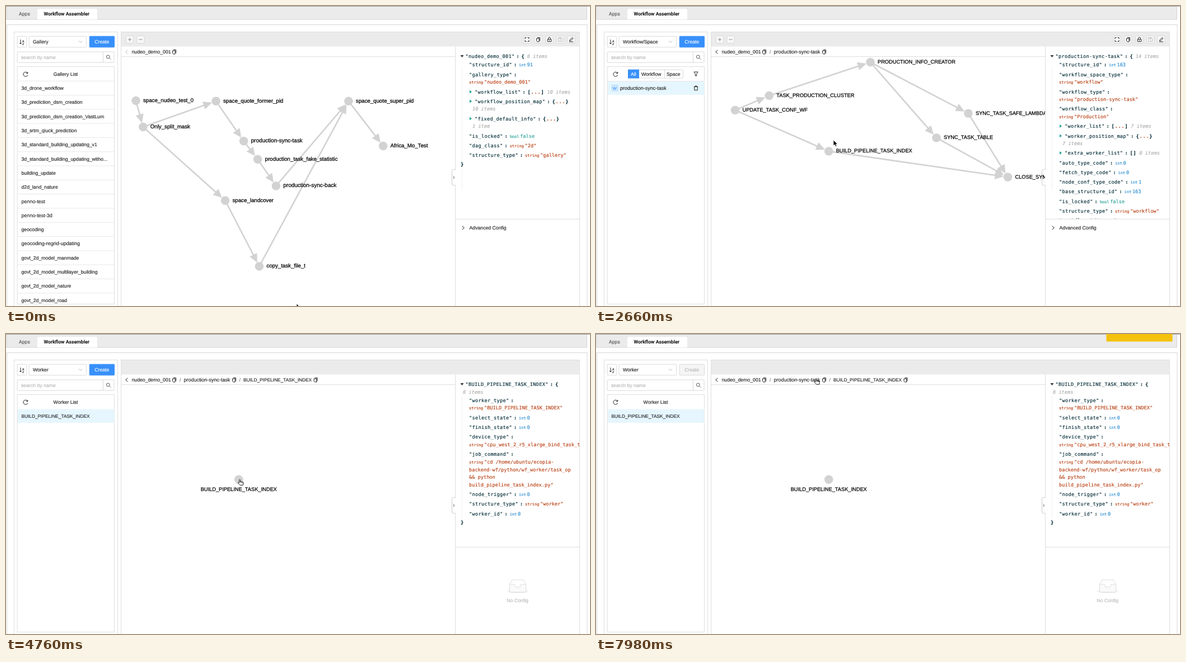
Recreate the animation shown at these times as an HTML page. Size 1043 by 537 pixels, loop 8 s.

```html
<!DOCTYPE html>
<html lang="en">
<head>
<meta charset="utf-8">
<title>Workflow Assembler</title>
<style>
html, body { margin: 0; width: 100%; height: 100%; overflow: hidden; background: #fff; }
svg { display: block; font: 8.7px "Liberation Sans", Arial, sans-serif; color: #222; }
text, tspan { fill: currentColor; stroke: currentColor; stroke-width: .15px; text-rendering: geometricPrecision; }
.label { color: #000; stroke-width: .25px; }
.mono { font: 8.65px "DejaVu Sans Mono", monospace; color: #002b36; }
.key { letter-spacing: .3px; }
.b { font-weight: bold; }
.fold { font-weight: bold; letter-spacing: .75px; }
.note { color: #aaa; font-style: italic; }
.type { font-size: 7px; }
.int { color: #268bd2; }
.bool { color: #2aa198; }
.string { color: #b83f12; }
</style>
</head>
<body>
<svg id="stage" width="1043" height="537" viewBox="0 0 1043 537"></svg>
<script>
const GREY = '#d2d2d2', BLUE = '#90caf9', PRIMARY = '#3890fa';
const stage = document.getElementById('stage');
const esc = s => s.replace(/&/g, '&amp;').replace(/</g, '&lt;');

// Hyphenated names run a little wide, capitals a little narrow.
const fit = s => /^[A-Z_]+$/.test(s) ? .955 : /-/.test(s) ? 1.03 : 1;
const text = (x, y, s, attrs = '', size = 8.7) =>
  `<text x="${x}" y="${y + 3.1}" font-size="${size * fit(s)}" ${attrs}>${esc(s)}</text>`;
const rect = (x, y, w, h, fill = '#fff', stroke = 'none', r = 0) =>
  `<rect x="${x}" y="${y}" width="${w}" height="${h}" rx="${r}" fill="${fill}" stroke="${stroke}"/>`;
const line = (d, color = '#222', width = 1) =>
  `<path d="${d}" fill="none" stroke="${color}" stroke-width="${width}"/>`;
const icon = (x, y, d, color) => `<g transform="translate(${x} ${y})">${line(d, color)}</g>`;
const copyIcon = (x, y) => icon(x, y, 'M-1.5-3.5h4.5v6M-3-2h4.5v6h-3l-1.5-1.5z');
const chevronRight = 'M-1.8-3.2L1.8 0-1.8 3.2';
const chevronDown = 'M-3-1.6L0 1.6 3-1.6';

function frame() {
  return rect(1, 0, 1036.5, 24, '#ebebeb', '#d4d4d4') +
    line('M0 .3H1043', '#8c8c8c') +
    '<path d="M56 24V8q0-3 3-3h101q3 0 3 3v16z" fill="#fff"/>' +
    text(23, 14, 'Apps', 'font-family="Roboto, sans-serif" color="#555"', 8.74) +
    text(67.5, 14, 'Workflow Assembler', 'font-family="Roboto, sans-serif" font-weight="700"', 8.74) +
    rect(1.5, 33.5, 1036.5, 520, 'none', '#d6d6d6') +
    rect(14.5, 46.5, 185, 520, 'none', '#dedede') +
    rect(205.5, 46.5, 819, 520, '#fff', '#dedede') +
    rect(206, 47, 818.5, 25.5, '#ebebeb') +
    line('M206 90.5H802M802.5 72V537M802.5 381.5H1024', '#dedede') +
    rect(20.2, 54.2, 16.6, 19.6, '#fff', '#d9d9d9', 1) +
    icon(26, 64, 'M0-4V4M-1.8 2L0 4 1.8 2') +
    text(29, 61.5, 'A', '', 5.5) + text(29, 67, 'Z', '', 5.5) +
    rect(41, 54.2, 102.6, 19.6, '#fff', '#d9d9d9', 1) + icon(133, 64, chevronDown, '#bbb') +
    rect(20.2, 82, 172.8, 19.2, '#fff', '#d9d9d9', 1) + line('M173.5 82V101', '#d9d9d9') +
    text(27, 91.5, 'search by name', 'color="#b5b5b5"') +
    icon(183, 91.5, 'M1.8 1.8L4 4M2.2-.6a2.9 2.9 0 1 1-5.8 0a2.9 2.9 0 1 1 5.8 0', '#555') +
    rect(20.2, 108.5, 173.2, 425, '#fff', '#dedede') +
    icon(35, 122, 'M3.3-2A4 4 0 1 0 3.8 1.3M3.8-4V-1.5H1.2');
}

function sidebar(mode, title, items) {
  let out = text(48, 64.2, mode);
  if (title) out += text(106.5, 122, title, 'text-anchor="middle"');
  else out += rect(57.5, 114.2, 98, 14.8, '#fff', '#d9d9d9', 1) + rect(57, 113.7, 20, 15.8, PRIMARY) +
    line('M122.5 114V129', '#d9d9d9') + text(62, 122, 'All', 'color="#fff"') +
    text(81, 122, 'Workflow') + text(126, 122, 'Space') +
    icon(178.5, 121.5, 'M-3.5-3.5H3.5L1.2 0V3.5H-1.2V0z');
  const single = items.length === 1;
  out += '<g clip-path="url(#listClip)">';
  if (single) out += rect(21, 134.5, 172.5, 24.5, '#e6f6fe');
  else out += line(items.map((_, i) => `M21 ${134.3 + i * 25.3}H193`).join(''), '#e8e8e8');
  items.forEach((name, i) => out += text(title ? 27.5 : 43, 147 + i * 25.3, name));
  if (!title) out += line('M21 134.5H193', '#e8e8e8') + rect(28.5, 141.5, 10.5, 10.5, '#d6ecfd', '#a9d4f7', 1) +
    text(29.8, 147, 'W', `color="${PRIMARY}"`, 8) +
    icon(178.5, 147, 'M-3.7-2.5H3.7M-1.4-2.5V-4H1.4V-2.5M-2.7-2.5V3.7H2.7V-2.5');
  return out + '</g>';
}

function crumbs(names, xs) {
  return icon(215.5, 82, 'M1.8-3.2L-1.8 0 1.8 3.2', names.length > 1 ? '#222' : '#bbb') +
    names.map((n, i) => text(xs[i], 82, n) + copyIcon([300.5, 407.5, 553][i], 82) +
      (i ? text(xs[i] - 7.5, 82, '/', 'color="#777"') : '')).join('');
}

function toolbar() {
  const box = x => rect(x - 6.5, 53.5, 13, 13, '#f8f8f8', '#d9d9d9', 1);
  const shapes = {
    221: 'M-3 0H3M0-3V3',
    240.5: 'M-3 0H3',
    930.5: 'M-3.5-1V-3.5H-1M1-3.5H3.5V-1M3.5 1V3.5H1M-1 3.5H-3.5V1',
    950.5: 'M-1.5-3.5H3v6M-3-2H1.5v6h-3L-3 2.5z',
    970.5: 'M-3.3-.3H3.3V3.7H-3.3zM-2-.3V-2a2 2 0 0 1 4 0V-.3M0 1v1.5',
    990: 'M-3.5-3.5H2L3.5-2V3.5H-3.5zM-1.5-3.5V-1.5H1.5V-3.5M-1 1H1',
    1009.5: 'M-3 2.5L-2.5.5 2-3.7 3.5-2.2-1 2zM-3.7 4H3.7'
  };
  return Object.entries(shapes).map(([x, d]) =>
    box(+x) + icon(x, 60, d, x < 300 ? '#888' : x === '990' ? '#bbb' : '#222')).join('');
}

const span = (s, cls, dx = 0) => `<tspan class="${cls}" dx="${dx}">${esc(s)}</tspan>`;
const keySpan = key => span(`"${key}"`, 'key') + span(':', 'b', 3);

// Each row reads: y, key (or -), kind, value.
function json(title, count, rows) {
  const monoText = (x, y, body) => `<text class="mono" x="${x}" y="${y + 3.1}">${body}</text>`;
  let out = '<g clip-path="url(#jsonClip)"><path d="M811.5 88h6l-3 4z" fill="#333"/>' +
    line('M814.5 111V330', '#f0f0f0') +
    monoText(820.5, 89.5, keySpan(title) + span('{', 'b', 4) + span(count, 'note', 5));
  for (const row of rows.trim().split('\n')) {
    const [ys, key, kind = '', ...rest] = row.trim().split(' ');
    const y = +ys, value = rest.join(' '), isFold = /^[[{]/.test(kind);
    let body = key === '-' ? '' : keySpan(key);
    const gap = body ? 4 : 0;
    if (isFold) {
      out += `<path d="M828 ${y - 3}l4 3-4 3z" fill="#2aa198"/>`;
      body += span(kind[0], 'fold', gap) + span(kind.slice(1, -1), 'fold string') +
        span(kind.slice(-1), 'fold') + span(value, 'note', 5);
    } else if (kind === 'end') body += span(value, 'b');
    else if (kind === 'note' || kind === 'count') body += span(value, 'note');
    else if (kind === 'more') body += span(value, 'string');
    else if (kind) body += span(kind, 'type ' + kind, gap) + span(value, kind, 1.7);
    out += monoText(isFold ? 837 : { note: 833, count: 816, end: 812 }[kind] || 827, y, body);
  }
  return out + '</g>';
}

function edge([x1, y1], [x2, y2], color) {
  const a = Math.atan2(y2 - y1, x2 - x1), length = Math.hypot(x2 - x1, y2 - y1);
  return `<g transform="translate(${x1} ${y1}) rotate(${a * 180 / Math.PI})" fill="${color}">` +
    line(`M0 0H${length - 18}`, color, 2.6) + `<path d="M${length - 7.6} 0l-15.5-7.3v14.6z"/></g>`;
}

// The first hot node is under the pointer, the second is its successor.
function graph(nodes, edges, hot = []) {
  const color = on => on ? BLUE : GREY;
  const isHot = i => hot.includes(i);
  return '<g clip-path="url(#graphClip)">' +
    edges.map(([a, b]) => edge(nodes[a], nodes[b], color(isHot(a) && isHot(b)))).join('') +
    nodes.map(([x, y, name], i) => {
      const size = 9.7 * (isHot(i) ? 1.2 : 1);
      const label = nodes.length === 1
        ? text(x, y + (isHot(i) ? 19.5 : 17), name, 'class="label" text-anchor="middle"', size)
        : text(x + (isHot(i) ? 15 : 13), y - (isHot(i) ? .3 : .7), name, 'class="label"', size);
      return `<circle cx="${x}" cy="${y}" r="7.8" fill="${color(isHot(i))}"/>` + label;
    }).join('') + '</g>';
}

const handle = '<path d="M803 292.5H799.5q-3 0-3 3V318q0 3 3 3H803" fill="#fff" stroke="#ccc"/>' +
  icon(799.7, 307, 'M-1.2-2.2L1.2 0-1.2 2.2', '#555');
const advanced = icon(816.5, 397, chevronRight) + text(827.5, 396.7, 'Advanced Config');
const noConfig = '<ellipse cx="914" cy="460" rx="19" ry="4" fill="#f3f3f3"/>' +
  '<path d="M899.5 448L904 440H924L928.5 448V462H899.5z" fill="#fff" stroke="#ddd"/>' +
  '<path d="M899.5 448H908q1 5 3 5H917q2 0 3-5H928.5V462H899.5z" fill="#fafafa" stroke="#ddd"/>' +
  text(913.5, 476.5, 'No Config', 'text-anchor="middle" color="#b8b8b8"');

const galleryList = `3d_drone_workflow 3d_prediction_dsm_creation 3d_prediction_dsm_creation_VastLum
  3d_srtm_qiuck_prediction 3d_standard_building_updating_v1 3d_standard_building_updating_witho...
  building_update d2d_land_nature penno-test penno-test-3d geocoding geocoding-regrid-updating
  govt_2d_model_manmade govt_2d_model_multilayer_building govt_2d_model_nature govt_2d_model_road`.split(/\s+/);

const path = ['nudeo_demo_001', 'production-sync-task', 'BUILD_PIPELINE_TASK_INDEX'];
const crumbX = [224.5, 317.5, 424];

const scenes = [{
  shell: toolbar() + sidebar('Gallery', 'Gallery List', galleryList) + crumbs(path.slice(0, 1), crumbX) + advanced +
    json(path[0], '8 items', `105 structure_id int 91
      122.5 gallery_type
      136 - string "nudeo_demo_001"
      153.5 workflow_list [...] 10 items
      170.5 workflow_position_map {...}
      184 - note 10 items
      201.5 fixed_default_info {...}
      215 - note 1 item
      232.5 is_locked bool false
      249.5 dag_class string "2d"
      267 structure_type string "gallery"
      282.5 - end }`),
  nodes: [[232, 169.5, 'space_nudeo_test_0'], [244.8, 216.5, 'Only_split_mask'], [375, 170.3, 'space_quote_former_pid'],
    [424.5, 241.7, 'production-sync-task'], [449.5, 274.5, 'production_task_fake_statistic'],
    [482.3, 322, 'production-sync-back'], [391.5, 348.2, 'space_landcover'], [452.3, 466, 'copy_task_file_t'],
    [611.8, 170.3, 'space_quote_super_pid'], [673.6, 250.6, 'Africa_Mo_Test']],
  edges: [[0, 1], [1, 2], [2, 3], [3, 4], [4, 5], [5, 8], [1, 6], [6, 7], [7, 8], [8, 9]],
  hot: [3, 4]
}, {
  shell: toolbar() + sidebar('Workflow/Space', '', [path[1]]) + crumbs(path.slice(0, 2), crumbX) + advanced +
    json(path[1], '14 items', `105 structure_id int 163
      122.5 workflow_space_type
      136 - string "workflow"
      153.5 workflow_type
      167 - string "production-sync-task"
      184 workflow_class
      198 - string "Production"
      215 worker_list [...] 7 items
      232.5 worker_position_map {...}
      246 - note 7 items
      263 extra_worker_list [] 0 items
      280.5 auto_type_code int 0
      298 fetch_type_code int 0
      315 node_conf_type_code int 1
      332 base_structure_id int 163
      349.5 is_locked bool false
      367 structure_type string "workflow"
      384 workflow_id int 0`),
  nodes: [[248.5, 186.5, 'UPDATE_TASK_CONF_WF'], [309.3, 160.5, 'TASK_PRODUCTION_CLUSTER'],
    [490, 100.5, 'PRODUCTION_INFO_CREATOR'], [665, 192.3, 'SYNC_TASK_SAFE_LAMBDA'],
    [608, 236, 'SYNC_TASK_TABLE'], [415.7, 260, path[2]], [735.5, 306.3, 'CLOSE_SYNC_TASK']],
  edges: [[0, 1], [1, 2], [2, 3], [2, 4], [3, 6], [4, 6], [0, 5], [5, 6]],
  hot: [5, 6]
}, {
  shell: sidebar('Worker', 'Worker List', [path[2]]) + crumbs(path, crumbX) + noConfig +
    json(path[2], '', `103.5 - count 8 items
      118.5 worker_type
      132 - string "BUILD_PIPELINE_TASK_INDEX"
      149.5 select_state int 0
      167 finish_state int 0
      184 device_type
      198 - string "cpu_west_2_r5_xlarge_bind_task_type"
      215 job_command
      229 - string "cd /home/ubuntu/ecopia-
      242.5 - more backend-wf/python/wf_worker/task_op
      256 - more && python
      269.5 - more build_pipeline_task_index.py"
      286.5 node_trigger int 0
      304 structure_type string "worker"
      321.5 worker_id int 0
      337 - end }`),
  nodes: [[415.7, 260.5, path[2]]],
  edges: [],
  hot: [0]
}];

const clip = (id, x, y, w, h) => `<clipPath id="${id}">${rect(x, y, w, h)}</clipPath>`;
stage.innerHTML = `<defs>${clip('graphClip', 206, 91, 596, 446)}${clip('jsonClip', 803, 73, 221.5, 308)}` +
  clip('listClip', 20, 108, 174, 425) + '</defs>' + frame() +
  rect(149.2, 54.2, 44.3, 19.6, PRIMARY, PRIMARY, 1).replace('<rect', '<rect id="createBox"') +
  text(171.3, 64.2, 'Create', 'id="createText" text-anchor="middle"') + handle +
  scenes.map(s => `<g class="scene">${s.shell}<g>${graph(s.nodes, s.edges)}</g>` +
    `<g>${graph(s.nodes, s.edges, s.hot)}</g></g>`).join('') +
  `<rect id="notice" x="911.5" width="118" height="13.5" fill="#f4c20d"/>
  <g id="pointer">
    <circle id="ring" r="17.9" fill="none" stroke="#000" stroke-width="2"/>
    <path id="arrow" d="M0 0V10L2.4 7.9 4 11.4 5.8 10.6 4.3 7.2H7.4z" fill="#000" stroke="#fff" stroke-width=".7"/>
    <path id="hand" d="M-1 6V1Q0-.6 1 1V4Q2 3.2 3 4.4 4 3.8 5 5 6.6 4.8 6.4 6.6L5.6 10.7H.6L-3 6.8Q-2.8 5-1 6.4M1 4V6M3 4.4V6.2M5 5V6.6" fill="#fff" stroke="#000" stroke-width=".9"/>
  </g>`;

const $ = id => document.getElementById(id);
const groups = [...stage.querySelectorAll('.scene')];
const show = (el, on) => el.style.display = on ? '' : 'none';
const clamp = v => Math.min(1, Math.max(0, v));
const mix = (a, b, k) => a + (b - a) * k;
const rgb = (a, b, k) => `rgb(${a.map((v, i) => Math.round(mix(v, b[i], k)))})`;

const route = [[0, 519, 533], [770, 428, 244], [910, 428, 244], [1050, 427, 242.5], [1120, 427, 242.5],
  [1260, 426.5, 241.5], [1330, 426.5, 241.5], [1400, 424.7, 240.3], [2380, 424.7, 240.3], [2450, 424, 240],
  [2940, 424, 240], [3360, 417.5, 260], [5110, 417.5, 260], [5460, 416, 260.5], [7000, 416, 260.5],
  [7350, 398, 76], [7770, 398, 76], [7980, 393, 79.5]];
const clicks = [[1540, 1680], [2170, 2240], [2310, 2450], [4410, 4480], [4550, 4620],
  [5740, 5810], [5880, 5950], [6020, 6090], [6160, 6230], [6650, 6930]];
const within = (t, spans) => spans.some(([a, b]) => t >= a && t < b);

function pointerAt(t) {
  const i = Math.max(1, route.findIndex(p => p[0] >= t));
  const [t0, x0, y0] = route[i - 1], [t1, x1, y1] = route[i];
  let k = clamp((t - t0) / (t1 - t0));
  k = k * k * (3 - 2 * k);
  return [mix(x0, x1, k), mix(y0, y1, k)];
}

function draw(now) {
  const t = Math.floor(now % 8000 / 70) * 70;
  const scene = t < 2520 ? 0 : t < 4760 ? 1 : 2;
  const hovering = within(t, [[1400, 2520], [3360, 4760], [5670, 7140]]);
  groups.forEach((g, i) => {
    show(g, i === scene);
    show(g.lastChild, hovering);
    show(g.lastChild.previousSibling, !hovering);
  });

  const off = clamp((t - 4760) / 210);
  $('createBox').setAttribute('fill', rgb([56, 144, 250], [245, 245, 245], off));
  $('createBox').setAttribute('stroke', rgb([56, 144, 250], [217, 217, 217], off));
  $('createText').setAttribute('color', rgb([255, 255, 255], [184, 184, 184], off));

  const useHand = within(t, [[1400, 2450], [3360, 7140], [7910, 8000]]);
  $('pointer').setAttribute('transform', `translate(${pointerAt(t)})`);
  show($('hand'), useHand);
  show($('arrow'), !useHand);
  show($('ring'), within(t, clicks));
  $('notice').setAttribute('opacity', clamp((t - 7140) / 490));
}

const start = performance.now();
(function tick() {
  draw(performance.now() - start);
  requestAnimationFrame(tick);
})();
</script>
</body>
</html>
```
